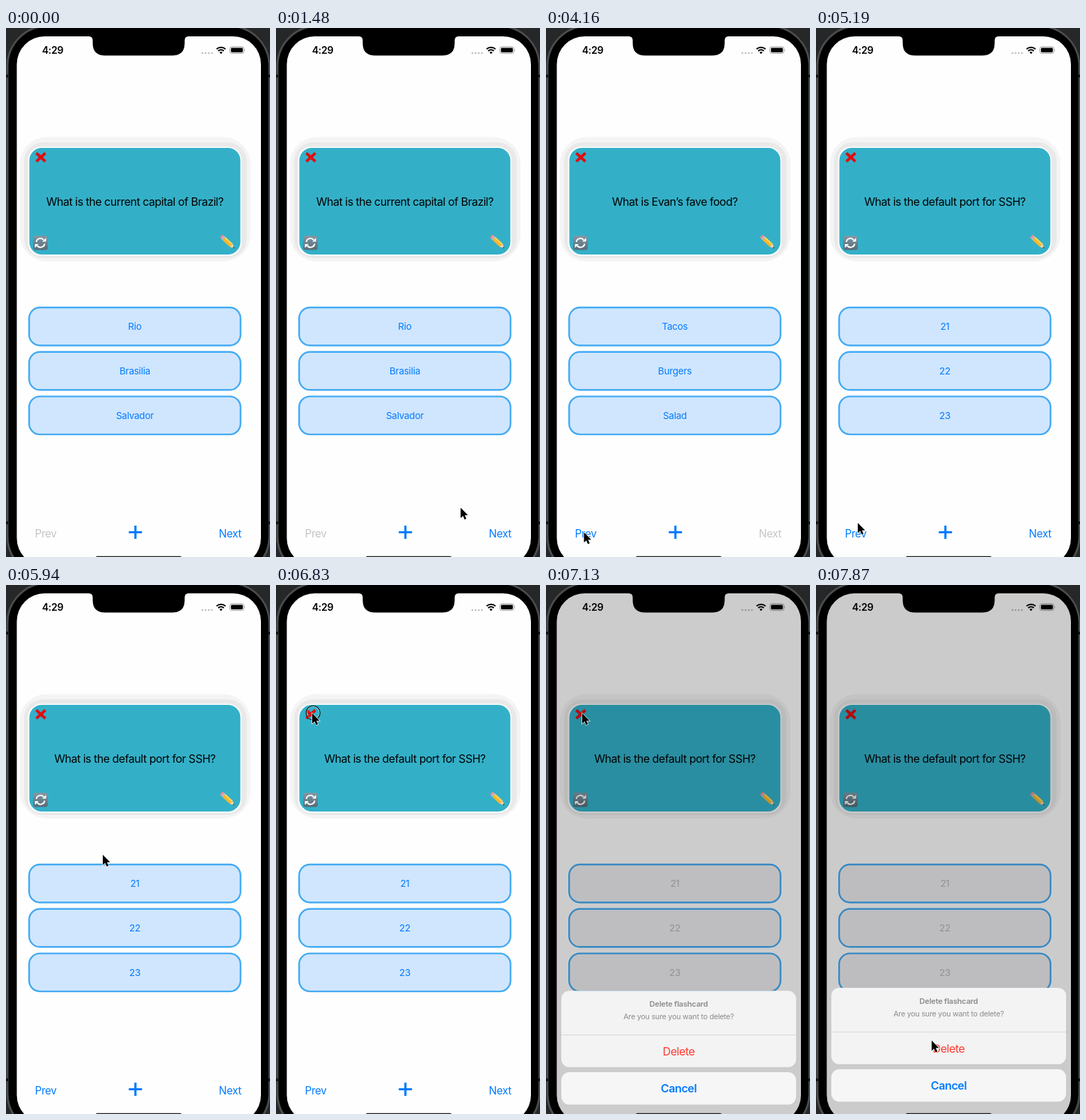
Recreate the animation shown at these times as an HTML page. Size 379 by 759 pixels, loop 8 s.

```html
<!DOCTYPE html>
<html lang="en">
<head>
<meta charset="utf-8">
<title>Flashcards</title>
<style>
html, body { margin: 0; width: 100%; height: 100%; overflow: hidden; background: #262728; }
svg { display: block; width: 100%; height: 100%; }
text { font-family: Inter, Roboto, "Liberation Sans", sans-serif; }
.mid { text-anchor: middle; }
.question { font-size: 16px; letter-spacing: -.5px; }
.option { font-size: 13.5px; letter-spacing: -.25px; }
.nav { font-size: 15.3px; letter-spacing: -.35px; }
.action { font-size: 16.2px; letter-spacing: -.5px; }
.clock { font-size: 14.2px; letter-spacing: -.3px; font-weight: 600; }
</style>
</head>
<body>
<svg viewBox="0 0 379 759">
  <defs>
    <clipPath id="screen"><rect x="15.5" y="12" width="350.5" height="760" rx="40"/></clipPath>
    <linearGradient id="tile" x2="0" y2="1"><stop stop-color="#8298a5"/><stop offset="1" stop-color="#566b78"/></linearGradient>
  </defs>

  <rect x="2" y="-3" width="376" height="790" rx="58" stroke="#4b4c4d" stroke-width="3"/>
  <rect x="4" y="-1" width="372.5" height="786" rx="55"/>
  <path d="M0 69h3M376 69h3M0 710h3M376 710h3" stroke="#111" stroke-width="4"/>

  <g clip-path="url(#screen)">
    <rect width="379" height="759" fill="#fefefe"/>

    <rect x="20" y="156.5" width="331" height="178.5" rx="38" fill="#f4f4f4"/>
    <rect x="26" y="164" width="319.5" height="166" rx="27" fill="#e9e9e9"/>
    <rect x="31.5" y="170.5" width="306.5" height="156.5" rx="19" fill="#fefefe"/>
    <rect x="33.5" y="172" width="303" height="153" rx="18" fill="#33b0c8"/>
    <text id="question" class="question mid" x="185" y="254.5"></text>

    <path d="M43.5 179.5L56.5 191.5M56.5 179.5L43.5 191.5" stroke="#e00d12" stroke-width="4"/>
    <rect x="39" y="298" width="21" height="20.5" rx="3.5" fill="url(#tile)"/>
    <g fill="none" stroke="#fff" stroke-width="2">
      <path d="M43.5 307a6 6 0 0 1 10.5-3M55.5 309.5a6 6 0 0 1-10.5 3"/>
      <path d="M52 306.5h5.5v-5.500zM47 310h-5.500v5.500z" fill="#fff" stroke="none"/>
    </g>
    <g transform="translate(309 298.500) rotate(43)">
      <rect y="-3" width="4" height="6" rx="1.500" fill="#f08a98"/>
      <rect x="3" y="-3" width="2.500" height="6" fill="#b9bfc4"/>
      <rect x="5.500" y="-3" width="14" height="6" fill="#f9b62c"/>
      <rect x="5.500" y="-3" width="14" height="2" fill="#ffd95c"/>
      <path d="M19.500-3L26 0L19.500 3z" fill="#f3d2a4"/>
      <path d="M23.500-1.200L26 0L23.500 1.200z" fill="#333"/>
    </g>

    <g id="options"></g>

    <text id="prev" class="nav" x="41.500" y="731">Prev</text>
    <text id="next" class="nav" x="305.500" y="731">Next</text>
    <path d="M176.300 723.500h19M185.800 714v19" stroke="#007aff" stroke-width="3.200"/>

    <text class="clock mid" x="67" y="36.700">4:29</text>
    <path d="M282 36h15" stroke="#bcbcbe" stroke-width="2.700" stroke-linecap="round" stroke-dasharray="0 4.500"/>
    <g fill="none" stroke="#000" stroke-width="2">
      <path d="M302.300 30.300a9.200 9.200 0 0 1 12.800 0M304.700 33a5.700 5.700 0 0 1 8 0"/>
      <path d="M306.600 35a3 3 0 0 1 4.200 0l-2.100 2.200z" fill="#000" stroke="none"/>
    </g>
    <rect x="321.500" y="27" width="20" height="9.500" rx="2.700" fill="none" stroke="#999"/>
    <rect x="323" y="28.500" width="17" height="6.500" rx="1.400"/>
    <path d="M342.700 30.300q1.500 1.500 0 3z" fill="#999"/>

    <rect id="dim" width="379" height="759"/>

    <g id="sheet">
      <rect x="22" y="578" width="337" height="109.500" rx="11.500" fill="#f3f3f3"/>
      <path d="M22 641.300h337" stroke="#d6d6d7"/>
      <g fill="#8b8b8d">
        <text class="mid" x="190.500" y="600.500" font-size="11" font-weight="600" letter-spacing="-.2">Delete flashcard</text>
        <text class="mid" x="190.500" y="618.500" font-size="10.700" letter-spacing="-.22">Are you sure you want to delete?</text>
      </g>
      <text class="action mid" x="190.500" y="670.700" fill="#ff3b30">Delete</text>
      <rect x="22" y="694.800" width="337" height="46.500" rx="11.500" fill="#f6f6f6"/>
      <text class="action mid" x="190.500" y="723.800" font-weight="600" fill="#007aff">Cancel</text>
    </g>

    <rect x="129" y="757.700" width="123" height="4.500" rx="2.200" fill="#1c1c1c"/>
    <path d="M119 11v1q5.500 0 5.500 6v4q0 17.500 18 17.500h96q18 0 18-17.500v-4q0-6 5.500-6v-1z"/>
  </g>

  <g id="pointer">
    <g id="press" fill="none">
      <circle cx="1.800" r="9.200" stroke="#fff" stroke-opacity=".7"/>
      <circle cx="1.800" r="10" stroke="#111" stroke-width="1.200"/>
    </g>
    <path d="M.5 .5V15.300L3.900 12.200L6.200 17.400L8.700 16.300L6.500 11.300H11z" stroke="#fff" stroke-width="1.300" paint-order="stroke"/>
  </g>
</svg>

<script>
const LOOP = 8000, STEP = 148.5;
const BLUE = [0, 122, 255], GRAY = [182, 182, 185];
const FILL = [208, 230, 254], FILL_OFF = [236, 236, 238];
const DISABLED = "#c4c4c6";

const cards = [
  ["What is the current capital of Brazil?", "Rio", "Brasilia", "Salvador"],
  ["What is the default port for SSH?", "21", "22", "23"],
  ["What is Evan’s fave food?", "Tacos", "Burgers", "Salad"]
];

// start step, end step, then start, control and end point
const moves = [
  [4, 8, 272, 505, 270, 590, 255, 655],
  [9, 12, 255, 655, 267, 728, 328.5, 726],
  [21, 28, 328.5, 726, 190, 714, 54, 723],
  [34, 38, 54, 723, 66, 692, 148, 500],
  [38, 44, 148, 500, 140, 260, 51.5, 183.5],
  [49, 53, 51.5, 183.5, 90, 420, 165.5, 653]
];
const presses = [13, 20, 29, 30, 46];

const $ = id => document.getElementById(id);
const clamp = v => Math.max(0, Math.min(1, v));
const mix = (a, b, k) => `rgb(${a.map((v, i) => Math.round(v + (b[i] - v) * k))})`;

function add(parent, tag, attrs) {
  const node = document.createElementNS(parent.namespaceURI, tag);
  for (const key in attrs) node.setAttribute(key, attrs[key]);
  return parent.appendChild(node);
}

const options = [0, 1, 2].map(i => {
  const y = 401 + i * 63.8;
  return {
    box: add($("options"), "rect", { x: 33.2, y, width: 303.5, height: 54.5, rx: 15.5, stroke: "#42aaf4", "stroke-width": 2.4 }),
    label: add($("options"), "text", { class: "option mid", x: 185, y: y + 32 })
  };
});

function pointerAt(s) {
  const [a, b, x0, y0, cx, cy, x1, y1] = moves.filter(m => s >= m[0]).pop() || moves[0];
  const u = clamp((s - a) / (b - a)), k = u * u * (3 - 2 * u);
  const curve = (p, c, q) => (1 - k) * (1 - k) * p + 2 * k * (1 - k) * c + k * k * q;
  return [curve(x0, cx, x1), curve(y0, cy, y1)];
}

function draw(t) {
  const s = Math.floor((t + 12) / STEP);
  const page = s < 13 ? 0 : s < 20 ? 1 : s < 30 ? 2 : 1;
  const [question, ...answers] = cards[page];
  const shown = 1 - (1 - clamp((s - 46) / 3)) ** 3.4;

  $("question").textContent = question;
  options.forEach(({ box, label }, i) => {
    label.textContent = answers[i];
    label.setAttribute("fill", mix(BLUE, GRAY, shown));
    box.setAttribute("fill", mix(FILL, FILL_OFF, clamp(shown * 1.5)));
  });

  const active = mix(BLUE, GRAY, shown);
  $("prev").setAttribute("fill", page === 0 ? DISABLED : active);
  $("prev").setAttribute("opacity", s === 29 ? 0.3 : 1);
  $("next").setAttribute("fill", page === 2 ? DISABLED : active);

  $("dim").setAttribute("opacity", 0.2 * shown);
  $("sheet").setAttribute("transform", `translate(0 ${181 * (1 - shown)})`);

  $("pointer").setAttribute("visibility", s < 4 ? "hidden" : "visible");
  $("pointer").setAttribute("transform", `translate(${pointerAt(s)})`);
  $("press").setAttribute("opacity", presses.includes(s) ? 1 : 0);
}

const start = performance.now();
function tick() {
  draw((performance.now() - start) % LOOP);
  requestAnimationFrame(tick);
}
tick();
</script>
</body>
</html>
```
